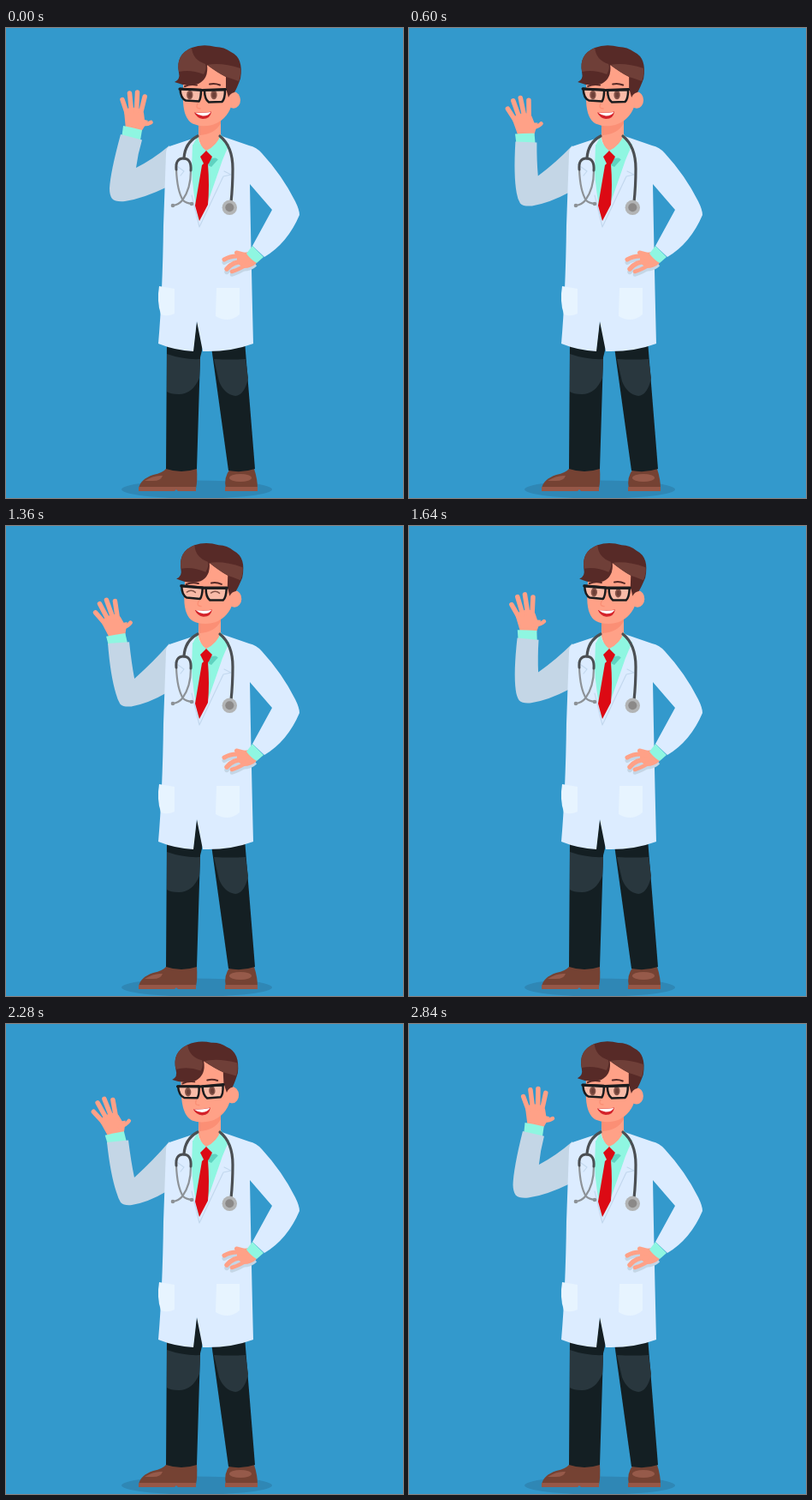
Recreate the animation shown at these times as an HTML page with a canvas. Size 464 px wide and 548 px high, loop 2880 ms.

```html
<!DOCTYPE html>
<html lang="en">
<head>
<meta charset="utf-8">
<title>Waving doctor</title>
<style>
html, body { margin: 0; width: 100%; height: 100%; overflow: hidden; background: #3399cc; }
canvas { display: block; }
</style>
</head>
<body>
<canvas id="stage" width="464" height="548"></canvas>
<script>
const ctx = document.getElementById('stage').getContext('2d');
const LOOP = 2880, WAVE = 960, STEP = 40;

const C = {
  bg: '#3399cc', floor: '#2f87b5', coat: '#dcecff', coatShade: '#c4d6e6', fold: '#c3d8ee',
  pocket: '#e7f4ff', mint: '#8ff6e1', mintShade: '#5fd3c0', tie: '#dc0a14',
  skin: '#ffa187', skinShade: '#fb8f75', hair: '#572a27', hairLight: '#6f3f38',
  pants: '#141f23', knee: '#29373e', shoe: '#754233', shoeLight: '#965a4a', sole: '#965747',
  tube: '#4b4f53', metal: '#8d9297', black: '#1b1c1e', iris: '#87554a'
};

function fill(d, color) {
  ctx.fillStyle = color;
  ctx.fill(new Path2D(d));
}

function line(d, color, width) {
  ctx.strokeStyle = color;
  ctx.lineWidth = width;
  ctx.stroke(new Path2D(d));
}

function oval(x, y, rx, ry, color) {
  ctx.fillStyle = color;
  ctx.beginPath();
  ctx.ellipse(x, y, rx, ry, 0, 0, Math.PI * 2);
  ctx.fill();
}

const mix = (a, b, u) => a + (b - a) * u;

// Linear interpolation through [time, value] pairs
function track(keys, t) {
  let i = 1;
  while (i < keys.length - 1 && t > keys[i][0]) i++;
  const [t0, a] = keys[i - 1], [t1, b] = keys[i];
  return mix(a, b, (t - t0) / (t1 - t0));
}

// Blend two path strings with the same commands
function morph(a, b, u) {
  const ends = b.match(/[\d.]+/g);
  let i = 0;
  return a.replace(/[\d.]+/g, n => mix(+n, +ends[i++], u).toFixed(2));
}

const waveKeys = [[0, 0], [360, 1], [960, 0]];
const headKeys = [[0, 0], [560, 0], [1120, 2], [1680, 2], [2280, -2.8], [2880, 0]];

const sleeveIn = 'M134 124L159 130.5Q154 147 152 163Q172 153 191 137L189 185Q160 199 139 202Q128 203 124 199Q121 195 121 187Q122 168 134 124Z';
const sleeveOut = 'M118 138L143 135.5Q146 160 150 179Q172 159 191 137L188 195Q166 208 147 211Q138 212 134 208Q131 203 129 196Q122 175 118 138Z';

function legs() {
  oval(223, 538, 88, 10.5, C.floor);
  fill('M155 537Q157 526 172 521Q183 519 188 513H223Q224 528 222 537Z', C.shoe);
  fill('M162 528Q173 521 183 522Q181 528 172 528Z', C.shoeLight);
  fill('M155 535H222V540H201L199 538L197 540H155Z', C.sole);
  fill('M257 537Q254 524 262 514H290Q294 526 294 537Z', C.shoe);
  oval(274, 524.5, 13, 4.5, C.shoeLight);
  fill('M256 535H294V540H256Z', C.sole);
  fill('M188 365L219 372L223 340L230 372L227 384L223 514Q205 520 187 514Z', C.pants);
  fill('M240 372L279 365L291 514Q276 519 260 516Z', C.pants);
  fill('M188 380Q208 387 227 386L226 408Q218 427 202 427Q192 427 188 424Z', C.knee);
  fill('M243 386Q262 387 280 386L283 408Q279 428 268 429Q255 427 249 412Z', C.knee);
}

function waveArm(u) {
  ctx.save();
  ctx.translate(mix(148, 127, u), mix(117, 128, u));
  ctx.rotate(-24 * u * Math.PI / 180);
  fill('M-10 -20Q-6 -25 4 -24Q11 -23 13 -18L14 -10L18 -9L10 4L-8 1Z', C.skin);
  line('M-6.5 -17L-12 -33.5M-1.5 -20L-3.5 -41', C.skin, 5.5);
  line('M4.5 -20L5.5 -42M9.5 -18L14.2 -37', C.skin, 5.5);
  line('M9 -5Q17 -4 21.5 -7', C.skin, 4.6);
  fill('M-11 -3Q0 -1 11 2L9 14L-12.5 8.5Z', C.mint);
  ctx.restore();
  fill(morph(sleeveIn, sleeveOut, u), C.coatShade);
}

function coat() {
  fill('M224 127L191 138Q187 140 187 147L184 230Q183 310 178 368Q198 376 219 377L223 342L230 377Q262 378 289 368Q287 290 285 182L311 212L288 254L302 267Q329 251 343 218Q343 212 338 202Q323 172 299 146Q293 139 284 137L252 126Z', C.coat);
  fill('M179 301L197 304V333Q189 337 181 334Q176 319 179 301Z', C.pocket);
  fill('M246 303H273L273 334Q260 345 245 336Z', C.pocket);
  fill('M218 136L217 165Q218 190 225 224L237 200L253 154L261 135Z', C.mint);
  fill('M239 152L250 151L240 162L236 160Z', C.mintShade);
  line('M217 195L226 232L254 173L263 171L255 167', C.fold, 1.2);
  line('M197 159L208 167L204 172', C.fold, 1.2);
}

function collar() {
  fill('M225 104L251 100V127Q247 138 234 144Q226 137 225 128Z', C.skin);
  fill('M225 113Q242 115 251 104V111Q244 124 226 125Z', C.skinShade);
  fill('M224 126L218 137L218 153Q228 150 234 143Q226 138 224 126Z', C.mint);
  fill('M251 124L259 134L250 155L234 143Q247 137 251 124Z', C.mint);
  fill('M234 143L241 150L237 158L236 159Q238 184 236 206L226 225L221 207L229 160L231 158L227 150Z', C.tie);
}

function stethoscope() {
  line('M224 126Q209 134 208 152', C.tube, 3.2);
  line('M250 126Q265 138 265 164Q265 185 263 203', C.tube, 3.2);
  line('M199 165Q200 190 207 201Q210 204 217 205', C.metal, 2.2);
  line('M216 166Q216 188 206 201Q202 206 195 207', C.metal, 2.2);
  line('M199 165Q198 152 207 152Q217 152 216 166', C.tube, 3);
  oval(195, 207, 2.3, 2.3, C.metal);
  oval(217, 205, 2.3, 2.3, C.metal);
  oval(261.3, 209.3, 8.7, 8.7, '#b2b4b5');
  oval(261.3, 209.3, 5, 5, '#8b8988');
}

function hipHand() {
  const shape = color => {
    fill('M277 262L285 261L293 274Q287 280 278 280L270 274L270 266Z', color);
    line('M281 265L269.5 262', color, 5);
    line('M278 267Q265 264 255 270', color, 5);
    line('M279 272Q265 272 258 281', color, 5.4);
    line('M282 275Q274 281 264 284', color, 4.6);
  };
  ctx.save();
  ctx.translate(0, 3.5);
  shape(C.coatShade);
  ctx.restore();
  shape(C.skin);
  fill('M288 254L301 267L293 274Q286 270 281 263Z', C.mint);
}

function eye(x, y, closed) {
  if (closed) {
    line(`M${x - 5} ${y}Q${x} ${y - 4} ${x + 5} ${y}`, C.iris, 1.5);
    return;
  }
  oval(x, y, 3.7, 5.2, C.iris);
  oval(x + 0.2, y + 0.2, 2, 3.2, '#6e4038');
}

function head(angle, closed) {
  ctx.save();
  ctx.translate(238, 122);
  ctx.rotate(angle * Math.PI / 180);
  ctx.translate(-238, -122);

  oval(266, 84, 8, 9.7, C.skin);
  fill('M207 50L207 86Q208 106 218 111.5Q228 116 241 113Q257 108 263 92L264 36H225Z', C.skin);
  fill('M197 63Q204 60 202 52Q198 31 217 23Q230 18 245 22Q255 22 263 28Q278 35 274 59Q270 70 267 75Q262 76 260 81L257 70V57Q247 52 235 43Q237 59 225 65Q211 69 197 63Z', C.hair);
  fill('M202 51Q198 31 217 23Q218 37 233 42Q235 47 231 54Q216 48 202 51Z', C.hairLight);
  fill('M235 43Q252 40 274 47Q275 54 272 62Q264 59 257 57Q247 52 235 43Z', C.hairLight);

  ctx.save();
  if (closed) ctx.translate(0, 1);
  line('M209 68Q215 65 223 66.5M238 65.5Q244 64 250 66.5', C.hair, 2);
  ctx.restore();

  const lens = 'M203.5 71L228 72Q228 82 225.5 85.5L210 84.5Q204 82 203.5 71ZM232 72.5L256 72Q256 83 252.5 86L237 86.5Q232 83 232 72.5Z';
  fill(lens, '#f9bba8');
  eye(214.8, 78, closed);
  eye(243, 78, closed);
  line(lens, C.black, 2.5);
  line('M203 71L229 72.5L256.5 71.5', C.black, 3.2);

  line('M224 88Q221 94 227 94', C.skinShade, 1.4);
  fill('M220 98.5Q230 99.5 240 97.5Q239 106 230 106Q223 105 220 98.5Z', '#d4222a');
  fill('M221 98.8Q230 99.5 239.4 98Q237 102.5 230 102.5Q225 102 221 98.8Z', '#fff');
  ctx.restore();
}

function draw(t) {
  const phase = t % WAVE;
  ctx.fillStyle = C.bg;
  ctx.fillRect(0, 0, 464, 548);
  ctx.lineCap = ctx.lineJoin = 'round';
  legs();
  waveArm(track(waveKeys, phase));
  coat();
  collar();
  head(track(headKeys, t), phase >= 400 && phase < 520);
  stethoscope();
  hipHand();
}

const start = performance.now();
function frame() {
  const t = (performance.now() - start) % LOOP;
  draw(Math.floor(t / STEP) * STEP);
  requestAnimationFrame(frame);
}
frame();
</script>
</body>
</html>
```
